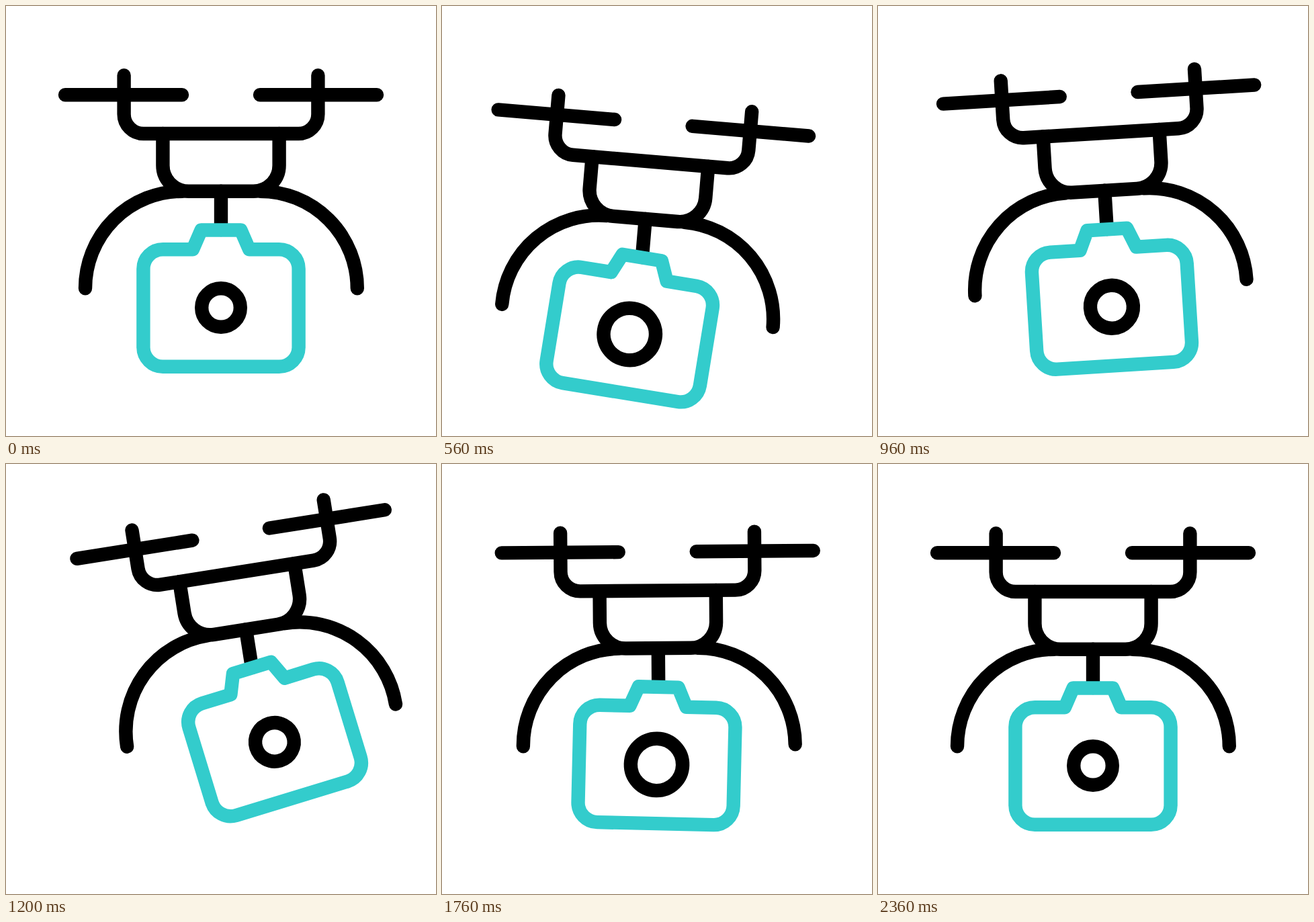
Write an HTML page that moves like this. It is 640 px wide and 640 px high and loops after 2.64 s.

```html
<!DOCTYPE html>
<html lang="en">
<head>
<meta charset="utf-8">
<title>Camera drone</title>
<style>
  html, body { margin: 0; width: 100%; height: 100%; overflow: hidden; background: #fff; }
  svg { display: block; width: 100%; height: 100%; }
  .line { fill: none; stroke: #000; stroke-width: 20.4; stroke-linecap: round; stroke-linejoin: round; }
</style>
</head>
<body>
<svg viewBox="0 0 640 640">
  <defs>
    <path class="route" d="M0 0C-3.3 6.8 -27 45.8 -19.7 40.8"/>
    <path class="route" d="M-19.7 40.8C-12.4 35.8 40.7 -23.2 44 -30"/>
    <path class="route" d="M44 -30C47.3 -36.8 7.3 -5 0 0"/>
  </defs>
  <g id="drone" class="line">
    <path d="M88 132.2H262M378 132.2H552"/>
    <path d="M175.6 103.2V161a29 29 0 0 0 29 29H435.4a29 29 0 0 0 29-29V103.2"/>
    <path d="M233.4 190V237.2a38.5 38.5 0 0 0 38.5 38.5H368.1a38.5 38.5 0 0 0 38.5-38.5V190"/>
    <path d="M118 420.3A144.6 144.6 0 0 1 262.6 275.7M522.8 420.3A144.6 144.6 0 0 0 378.2 275.7"/>
    <path d="M320 275.7V333"/>
    <g id="camera">
      <path stroke="#3cc" d="M233.4 362.3H278L290.5 333.5H349.5L362 362.3H406.6a29 29 0 0 1 29 29V507.7a29 29 0 0 1-29 29H233.4a29 29 0 0 1-29-29V391.3a29 29 0 0 1 29-29Z"/>
      <circle id="lens" cx="320" cy="449"/>
    </g>
  </g>
</svg>
<script>
const LOOP = 2640, STEP = 40;
const $ = id => document.getElementById(id);
const routes = [...document.querySelectorAll('.route')];

// Keys are [time in ms, value].
const tilt = [[0, 0], [640, 5], [1210, -9], [1248, -9], [1853, 0]];
const travel = [[0, 0], [640, 1], [1210, 2], [1248, 2], [1853, 3]];
const swing = [[100, 0], [704, 5], [1315, -9], [1355, -9], [1935, 4.3], [2350, 0]];
const lensRadius = [[0, 28.8], [560, 38.7], [590, 38.7], [1200, 28.8], [1730, 38.7], [2330, 28.8]];

// cubic-bezier(.42, 0, .58, 1)
function ease(u) {
  let lo = 0, hi = 1;
  for (let i = 0; i < 24; i++) {
    const q = (lo + hi) / 2;
    if (q * (1.26 + q * (0.52 * q - 0.78)) < u) lo = q; else hi = q;
  }
  return lo * lo * (3 - 2 * lo);
}

function valueAt(keys, t) {
  if (t <= keys[0][0]) return keys[0][1];
  const i = keys.findIndex(([time]) => time > t);
  if (i < 0) return keys[keys.length - 1][1];
  const [t0, a] = keys[i - 1], [t1, b] = keys[i];
  return a + (b - a) * ease((t - t0) / (t1 - t0));
}

function pointOnRoute(distance) {
  const leg = Math.min(Math.floor(distance), routes.length - 1);
  const route = routes[leg];
  return route.getPointAtLength((distance - leg) * route.getTotalLength());
}

function draw(t) {
  const { x, y } = pointOnRoute(valueAt(travel, t));
  $('drone').setAttribute('transform', `translate(${x} ${y}) rotate(${valueAt(tilt, t)} 320 320)`);
  $('camera').setAttribute('transform', `rotate(${valueAt(swing, t)} 320 333)`);
  $('lens').setAttribute('r', valueAt(lensRadius, t));
}

const start = performance.now();
function tick() {
  const t = (performance.now() - start) % LOOP;
  draw(Math.floor(t / STEP) * STEP);
  requestAnimationFrame(tick);
}
tick();
</script>
</body>
</html>
```
